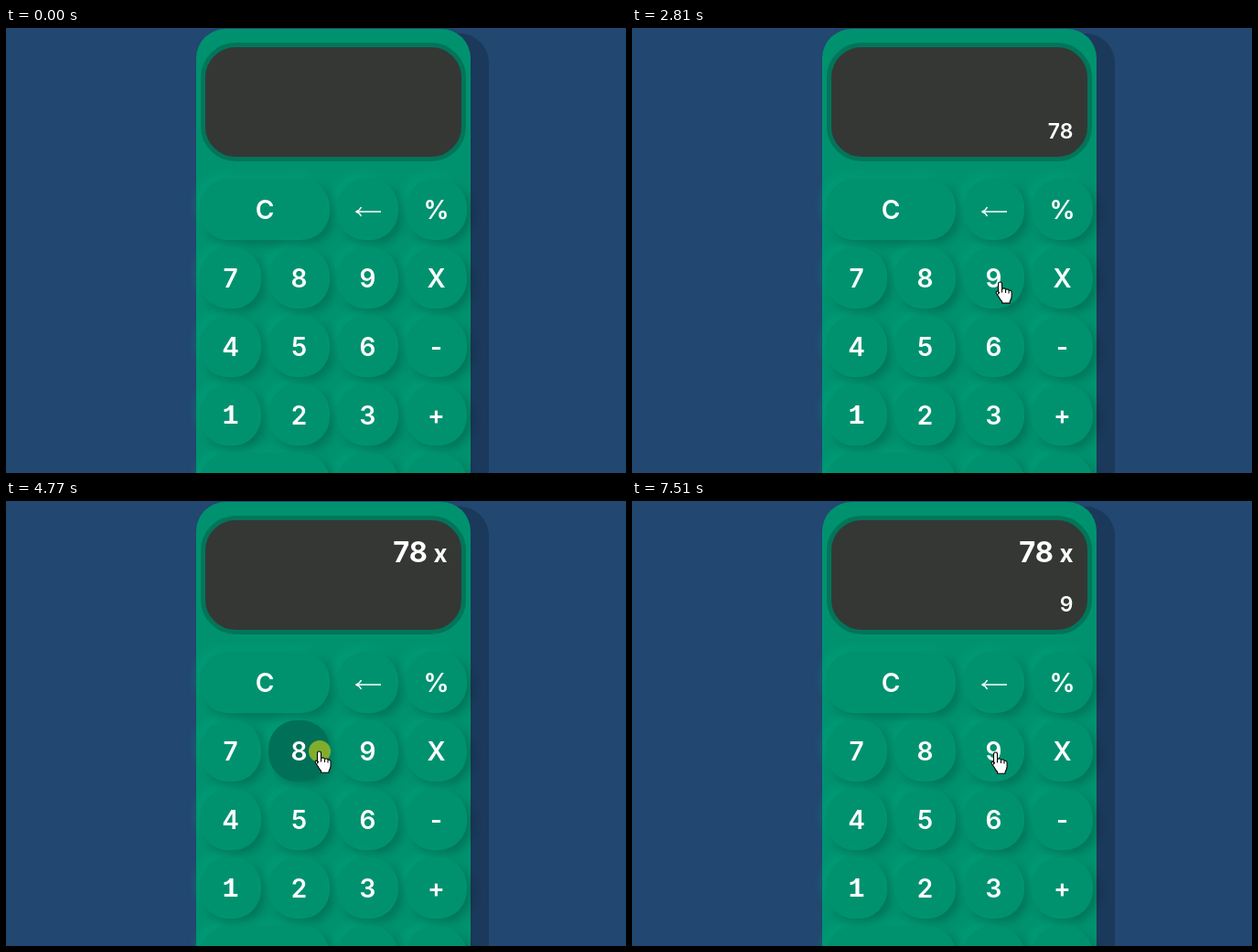
Write an HTML page that moves like this. It is 678 px wide and 487 px high and loops after 8000 ms.

```html
<!DOCTYPE html>
<html lang="en">
<head>
<meta charset="utf-8">
<title>Calculator</title>
<style>
  html, body { margin: 0; width: 100%; height: 100%; overflow: hidden; background: #224770; }
  body { position: relative; font: 600 28px Inter, sans-serif; color: #fff; }
  div, svg { position: absolute; box-sizing: border-box; }
  svg { left: 0; top: 0; }
  #case { left: 208px; top: 1px; width: 300px; height: 600px; border-radius: 32px;
    background: #00926f; box-shadow: 20px 5px rgba(0, 0, 0, .2); }
  #screen { left: 213px; top: 16px; width: 290px; height: 130px; border-radius: 38px;
    background: #353735; border: 5px solid #00755a; }
  .key { height: 67px; border-radius: 31px; line-height: 69px; text-align: center; background: #00926f;
    box-shadow: 5px 5px 11px rgba(0, 0, 0, .2), -5px -5px 11px rgba(0, 190, 140, .22); }
  .key.down { background: #007058; }
  .slab { font: 700 30px/70px "Liberation Mono", monospace; }
</style>
</head>
<body>
<div id="case"></div>
<div id="screen"></div>
<svg id="overlay" width="678" height="487" viewBox="0 0 678 487">
  <g fill="#fff" text-anchor="end">
    <g id="upper" font-weight="700">
      <text id="operand" x="461" y="66.5" font-size="31"></text>
      <text x="482.5" y="66.5" font-size="26">x</text>
    </g>
    <text id="lower" x="482.5" y="120.5" font-size="23"></text>
  </g>
  <path d="M383 201H410M388.5 196Q386.5 200 382.5 201 386.5 202 388.5 206" fill="none" stroke="#fff" stroke-width="1.4"/>
  <g id="pointer">
    <circle id="ring" r="12" fill="#ffeb00" fill-opacity=".5"/>
    <g fill="#fff" stroke="#000" stroke-width="1.1" stroke-linejoin="round">
      <path id="arrow" d="M0 0V16L3.7 12.5 6.2 18.3 8.6 17.3 6.1 11.6H11.3Z"/>
      <g id="hand">
        <path d="M-2.5 13V2a2 2 0 0 1 4 0v5.5q3-1.5 4 .8 3-1 3.6 1 3-.5 3 2.2v4q0 3-2 6v1.7h-8.5v-1.7q-2-2-3.5-5l-2.6-4q-1-2 .8-2.4 1.2-.2 2.2 1.4z"/>
        <path d="M1.5 7.5v4M5.5 8.5v3.5M9 9.5v3" fill="none"/>
      </g>
    </g>
  </g>
</svg>
<script>
const LOOP = 8000, PRESS = 135, SIZE = 67, PITCH = 75;
const byId = id => document.getElementById(id);
const keys = [];

function addKey(label, column, row, span = 1) {
  const el = document.createElement('div');
  const box = { el, x: 212 + PITCH * column, y: 165 + PITCH * row, w: PITCH * span - 8 };
  el.className = label === '1' ? 'key slab' : 'key';
  el.textContent = label;
  el.style.cssText = `left:${box.x}px;top:${box.y}px;width:${box.w}px`;
  document.body.insertBefore(el, byId('overlay'));
  keys.push(box);
}

// A space is a key without a text label; the first key of rows 0 and 4 is double width.
['C %', '789X', '456-', '123+', '   '].forEach((line, row) => {
  const wide = line.length === 3;
  [...line].forEach((label, i) => addKey(label, wide && i ? i + 1 : i, row, wide && !i ? 2 : 1));
});

// Each move curves through `bend` to a key, which then takes its clicks (release times).
const start = [607, 478];
const moves = [
  { key: '7', leave: 790, arrive: 1500, bend: [380, 290], at: [253, 265], clicks: [1660] },
  { key: '8', leave: 1740, arrive: 2010, bend: [286, 267], at: [318, 269], clicks: [2410] },
  { key: 'X', leave: 2740, arrive: 3280, bend: [521, 292], at: [481, 276], clicks: [3490] },
  { key: '8', leave: 3830, arrive: 4510, bend: [419, 250], at: [343, 274], clicks: [4835] },
  { key: '<', leave: 5100, arrive: 5640, bend: [332, 248], at: [398, 197], clicks: [5840, 6370] },
  { key: '9', leave: 6780, arrive: 7240, bend: [450, 236], at: [398, 275], clicks: [7510] }
];
const clicks = moves.flatMap(m => m.clicks.map(release => ({ key: m.key, release })));

const easeOut = u => 1 - (1 - u) ** 2;

function pointerAt(t) {
  const i = moves.findLastIndex(m => t >= m.leave);
  if (i < 0) return [-99, -99];
  const { leave, arrive, bend, at } = moves[i];
  const from = i ? moves[i - 1].at : start;
  const s = easeOut(Math.min(1, (t - leave) / (arrive - leave)));
  return at.map((end, d) => (1 - s) ** 2 * from[d] + 2 * s * (1 - s) * bend[d] + s * s * end);
}

function calculate(t) {
  let upper = '', lower = '';
  for (const { key, release } of clicks) {
    if (release > t) break;
    if (key === 'X') [upper, lower] = [lower, ''];
    else if (key === '<') lower = lower.slice(0, -1);
    else lower += key;
  }
  return { upper, lower };
}

const show = (id, on) => byId(id).setAttribute('visibility', on ? 'visible' : 'hidden');

function draw() {
  const t = performance.now() % LOOP;
  const [x, y] = pointerAt(t);
  const pressed = clicks.some(c => t >= c.release - PRESS && t < c.release);
  const hovered = keys.find(k => x >= k.x && x <= k.x + k.w && y >= k.y && y <= k.y + SIZE);
  const { upper, lower } = calculate(t);

  keys.forEach(k => k.el.classList.toggle('down', pressed && k === hovered));
  byId('pointer').setAttribute('transform', `translate(${x} ${y})`);
  show('ring', pressed);
  show('hand', hovered);
  show('arrow', !hovered);
  show('upper', upper);
  byId('operand').textContent = upper;
  byId('lower').textContent = lower;
  requestAnimationFrame(draw);
}
draw();
</script>
</body>
</html>
```
